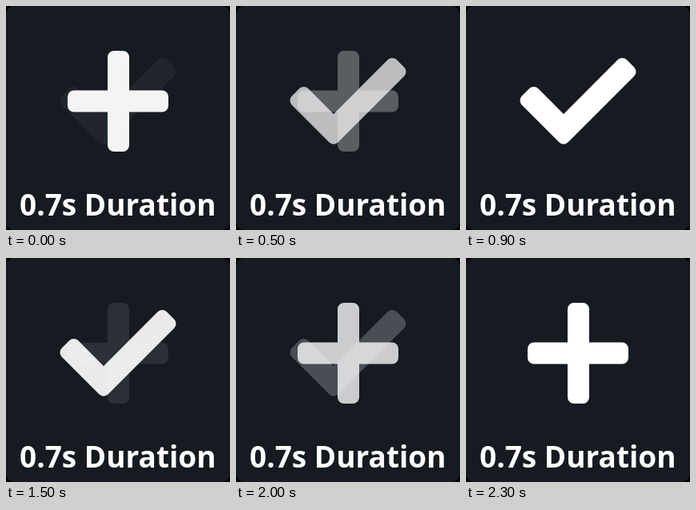
An HTML page that plays this animation: 280x280 px, repeating every 3 s.

```html
<!DOCTYPE html>
<html lang="en">
<head>
<meta charset="utf-8">
<title>Plus to check cross-fade</title>
<style>
  html, body { margin: 0; width: 100%; height: 100%; overflow: hidden; background: #000; }
  svg { display: block; width: 100vw; height: 100vh; }
  text { font: 700 37px "Open Sans", "Noto Sans", sans-serif; }
</style>
</head>
<body>
<svg viewBox="0 0 280 280" fill="#fff">
  <rect width="280" height="280" rx="10" fill="#161b22"/>
  <g id="plus">
    <path d="M135 64H146V113.5H195V124.5H146V174H135V124.5H85V113.5H135Z"
      stroke="#fff" stroke-width="16" stroke-linejoin="round"/>
  </g>
  <g id="check">
    <path d="M75.5 118.2L84.7 109L122 146.3L195.3 73L204.5 82.2L122 164.7Z"
      stroke="#fff" stroke-width="16" stroke-linejoin="round"/>
  </g>
  <text x="139.8" y="262" text-anchor="middle">0.7s Duration</text>
</svg>
<script>
  const LOOP = 3000, STEP = 100, FADE = 920;
  const plus = document.getElementById("plus");
  const check = document.getElementById("check");

  // Softened ease-in-out: mostly cosine with a little linear.
  function ease(x) {
    x = Math.min(1, Math.max(0, x));
    return 0.75 * (1 - Math.cos(Math.PI * x)) / 2 + 0.25 * x;
  }

  // Both fades are already under way when their half of the loop begins.
  function checkAmount(t) {
    return t < LOOP / 2
      ? ease((t + 100) / FADE)
      : 1 - ease((t - LOOP / 2 + 150) / FADE);
  }

  function draw(time) {
    const t = Math.floor((time % LOOP) / STEP) * STEP;
    const amount = checkAmount(t);
    check.setAttribute("opacity", amount);
    plus.setAttribute("opacity", 1 - amount);
  }

  let start = null;
  function tick(now) {
    if (start === null) start = now;
    draw(Math.max(0, now - start));
    requestAnimationFrame(tick);
  }

  draw(0);
  requestAnimationFrame(tick);
</script>
</body>
</html>
```
